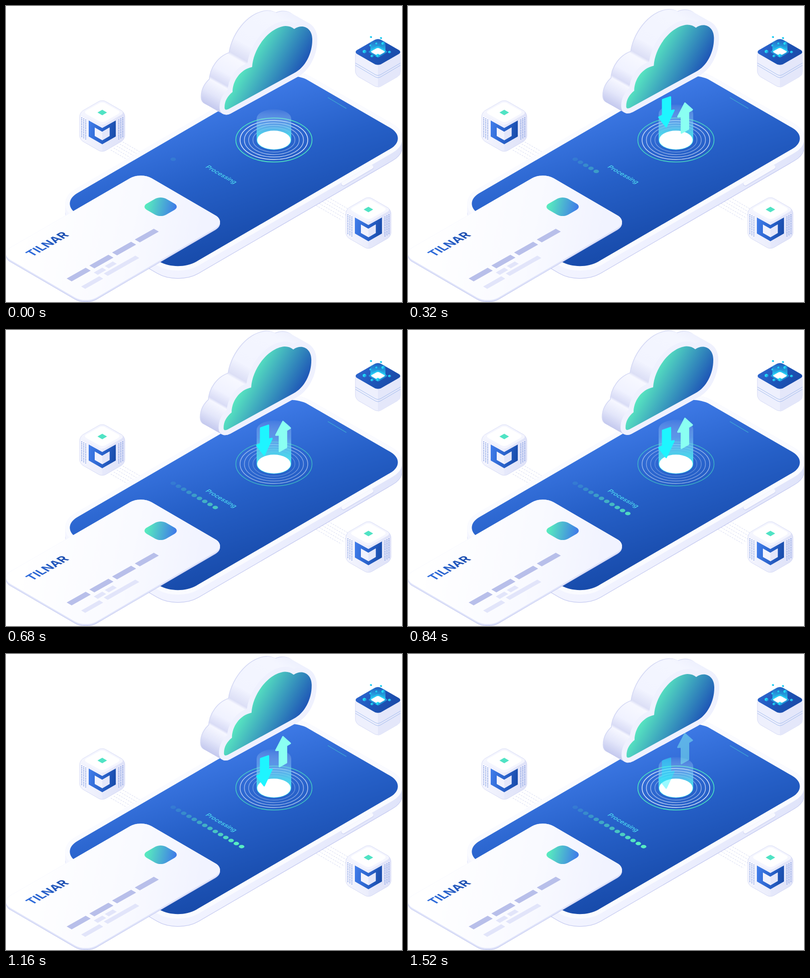
Recreate the animation shown at these times as an HTML page. Size 790 px wide and 592 px high, loop 1560 ms.

```html
<!DOCTYPE html>
<html lang="en">
<head>
<meta charset="utf-8">
<title>Processing</title>
<style>
html, body { margin: 0; width: 100%; height: 100%; overflow: hidden; background: #fff; }
svg { display: block; width: 100%; height: 100%; }
text { font-family: Inter, Roboto, sans-serif; }
</style>
</head>
<body>
<svg id="stage" viewBox="0 0 790 592" xmlns="http://www.w3.org/2000/svg"></svg>
<script>
const LOOP = 1560, STEP = 40;
const stage = document.getElementById('stage');
const clamp = (v) => Math.max(0, Math.min(1, v));
const ease = (v) => (1 - Math.cos(Math.PI * clamp(v))) / 2;
const list = (n, fn) => Array.from({ length: n }, (_, i) => fn(i)).join('');

// Polygon with corners rounded like circles seen in perspective
function poly(pts, r) {
  const n = pts.length;
  const toward = (a, b, d) => {
    const k = d / Math.hypot(b[0] - a[0], b[1] - a[1]);
    return (a[0] + (b[0] - a[0]) * k).toFixed(1) + ',' + (a[1] + (b[1] - a[1]) * k).toFixed(1);
  };
  return pts.map((p, i) => {
    const prev = pts[(i + n - 1) % n], next = pts[(i + 1) % n], h = r * 0.448;
    return (i ? 'L' : 'M') + toward(p, prev, r) +
      'C' + [toward(p, prev, h), toward(p, next, h), toward(p, next, r)].join(' ');
  }).join('') + 'Z';
}

const path = (d, fill, more = '') => `<path d="${d}" fill="${fill}" ${more}/>`;
const line = (d, color, more = '') => `<path d="${d}" fill="none" stroke="${color}" ${more}/>`;
const rhomb = (x, y, w, h) => [[x, y - h], [x + w, y], [x, y + h], [x - w, y]];

// Stacks shifted copies from back to front
const stack = (n, dx, dy, draw) => list(n + 1, (i) => {
  const k = 1 - i / n;
  return `<g transform="translate(${(dx * k).toFixed(2)} ${(dy * k).toFixed(2)})">${draw(i)}</g>`;
});

function grad(id, x1, y1, x2, y2, stops) {
  return `<linearGradient id="${id}" gradientUnits="userSpaceOnUse" x1="${x1}" y1="${y1}" x2="${x2}" y2="${y2}">` +
    stops.map(([o, c, a = 1]) => `<stop offset="${o}" stop-color="${c}" stop-opacity="${a}"/>`).join('') +
    '</linearGradient>';
}

const shade = [[20, '#bfc4ec'], [48, '#e3e6fa'], [72, '#f6f7ff'], [77, '#d9dcf6'], [98, '#f0f2ff'],
  [133, '#f7f8ff'], [139, '#dcdff6'], [168, '#f2f4ff'], [245, '#f4f6ff'], [290, '#e8ebfc']]
  .map(([s, c]) => [(s - 20) / 270, c]);

const defs = '<defs>' +
  grad('screenFill', 430, 170, 530, 470, [[0, '#407ce9'], [0.5, '#2660c8'], [1, '#174aa9']]) +
  grad('sideFill', 118, 0, 790, 0, [[0, '#f5f6ff'], [0.5, '#f0f2ff'], [1, '#e0e4fa']]) +
  grad('cardFill', 40, 430, 380, 500, [[0, '#ffffff'], [0.6, '#f9faff'], [1, '#f1f3ff']]) +
  grad('chipFill', 282, 396, 338, 408, [[0, '#57e8bf'], [0.5, '#4bb1d3'], [1, '#3f7be8']]) +
  grad('brandFill', 0, 0, 86, 0, [[0, '#2f6dde'], [1, '#1a4cae']]) +
  grad('skyFill', 470, 122, 563, 175, [[0, '#59e9c0'], [0.5, '#3b9fbe'], [1, '#1e55b6']]) +
  grad('edgeFill', 10, -17, 142, -252, shade) +
  grad('boxFill', 147, 0, 237, 0, [[0, '#f4f5fe'], [0.49, '#eceefc'], [0.51, '#e6e9fb'], [1, '#dfe2f8']]) +
  grad('badgeFill', 165, 245, 219, 255, [[0, '#3f7be8'], [0.5, '#2b64cd'], [1, '#184ba9']]) +
  grad('lidFill', 715, 75, 765, 112, [[0, '#2b63cb'], [0.5, '#1e55b8'], [1, '#1a4cab']]) +
  grad('rayFill', 0, 66, 0, 94, [[0, '#27e4ff', 0], [1, '#27e4ff', 0.9]]) +
  grad('beamFill', 0, 205, 0, 276, [[0, '#ffffff', 0.05], [0.35, '#8fcdfb', 0.42], [0.7, '#52d8ee', 0.9], [1, '#4df0f5', 1]]) +
  '</defs>';

function phone() {
  const d = poly([[566, 127.5], [803, 264.7], [343, 532.5], [106, 395.3]], 42);
  const rim = (c, w) => path(d, c, `stroke="${c}" stroke-width="${w}"`);
  return stack(16, 0, 16, (i) => i ? rim('url(#sideFill)', 18) : rim('#c6cbf1', 18.6)) +
    rim('#fafbff', 18) + path(d, 'url(#screenFill)') +
    line('M642,183L679,205', '#3fa9d2', 'stroke-width="1.2"') +
    line('M673,356L729,323', '#d5d9f5', 'stroke-width="9" stroke-linecap="round"') +
    line('M673,355L729,322', '#f8f9ff', 'stroke-width="7.5" stroke-linecap="round"') +
    '<text transform="matrix(.866 .5 -.866 .5 397 322.5)" font-size="12.6" font-weight="500" fill="#4fdcf0">Processing</text>';
}

function card() {
  const d = poly([[269, 332], [439.4, 431.3], [159.2, 595.5], [-12.8, 495.5]], 25);
  const bar = (x, y, w, t, c) => path(
    `M${x},${y}l${w},${-w * 0.567}l${t},${t * 0.58}l${-w},${w * 0.567}Z`, c);
  return stack(5, 0, 4, (i) => path(d, i ? '#dfe3fa' : '#bcc2ec')) +
    path(d, 'url(#cardFill)') +
    path(poly(rhomb(308.5, 401.5, 38.5, 22.2), 12.5), 'url(#chipFill)') +
    '<text transform="matrix(.866 -.5 .866 .5 52 502)" font-size="23.5" font-weight="700" fill="url(#brandFill)">TILNAR</text>' +
    list(4, (i) => bar(121 + i * 45.3, 545 - i * 26, 38, 10, '#b8bfea')) +
    bar(175, 533, 17, 8, '#e2e5fa') + bar(197, 520, 16, 8, '#e2e5fa') +
    bar(150, 561, 36, 8, '#e2e5fa') + bar(195, 535, 63, 8, '#e2e5fa');
}

function cube(dx, dy) {
  const column = (x, y, h) => line(`M${x},${y}v${h}`, '#4d74d3', 'stroke-width="1.4" stroke-dasharray="1.5 1.9"');
  return `<g transform="translate(${dx} ${dy})">` +
    path(poly([[192, 187], [237, 213], [237, 267], [192, 293], [147, 267], [147, 213]], 8),
      'url(#boxFill)', 'stroke="#c9cef2" stroke-width=".7"') +
    path(poly(rhomb(192, 213.5, 45, 26), 8), '#f4f5fe') +
    path(poly(rhomb(192, 212.5, 38, 21.5), 7), '#ffffff') +
    path('M182.5,213L192,207.5L201.5,213L192,218.5Z', '#50e3c4') +
    list(3, (i) => column(151 + i * 4, 223 + i * 2.3, 40) + column(233 - i * 4, 223 + i * 2.3, 40)) +
    path('M165,229L192,244L219,229V261L192,276.5L165,261Z', 'url(#badgeFill)') +
    path('M177,243L192,251.5L206.5,243V260L192,268.5L177,260Z', '#f1f2fd') +
    path('M192,251.5L206.5,243V260L192,268.5Z', '#e4e7fa') + '</g>';
}

function chest() {
  const bits = [[728, 62, 2], [748, 64, 2], [727, 79, 2], [739, 75, 2], [752, 75, 3], [715, 91, 3.4],
    [765, 92, 2.6], [730, 100, 2.6], [742, 99, 3.4]];
  return path(poly([[742, 65], [787, 91], [787, 138], [742, 164], [697, 138], [697, 91]], 8),
    '#eef0fd', 'stroke="#c9cef2" stroke-width=".7"') +
    path('M742,118L787,92V134Q787,138 783,140L746,162L742,163Z', '#e4e7fa') +
    line('M697,114L737,137.5Q742,140.5 747,137.5L787,114M697,118.5L737,142Q742,145 747,142L787,118.5', '#9fb9ec', 'stroke-width=".9"') +
    path(poly(rhomb(742, 92, 48.5, 28), 8), 'url(#lidFill)') +
    path(poly(rhomb(742, 91.5, 20, 12), 3), '#20c8f4', 'opacity=".55"') +
    path('M727,91V70L742,64L757,70V91L742,99Z', 'url(#rayFill)') +
    path(poly(rhomb(742, 91.5, 15, 8.5), 3), '#ffffff') +
    bits.map(([x, y, s]) =>
      path(`M${x - s},${y - s / 2}l${s},${-s / 2}l${s},${s / 2}v${s}l${-s},${s / 2}l${-s},${-s / 2}Z`, '#22dcf5') +
      path(`M${x},${y}l${s},${-s / 2}v${s}l${-s},${s / 2}Z`, '#1fa6e6')).join('');
}

function wires() {
  const dash = (d) => line(d, '#cfd4f0', 'stroke-width=".9" stroke-dasharray="3 2.2"');
  return list(5, (i) => dash(`M${233 - i * 6},${272 + i * 4}l38,22`)) +
    list(5, (i) => dash(`M${643 - i * 6},${383 + i * 4}l50,29`));
}

function cloud() {
  const d = 'M436,203C436,190 442,180 452,172C452,150 467,127 491,122C493,85 525,42 558,40Q568,40 575,46' +
    'C592,34 612,44 611,68C611,95 597,123 575,134L444,206Q436,210 436,203Z';
  const body = (c, w = 20) => path(d, c, `stroke="${c}" stroke-width="${w}" stroke-linejoin="round"`);
  return '<g id="cloud">' +
    stack(36, -37, -21, (i) => i ? body('url(#edgeFill)') : body('#d6daf5', 21)) +
    body('#eff1fe') + path(d, 'url(#skyFill)') + '</g>';
}

function portal() {
  const ring = (i) => `<ellipse cx="534.5" cy="268" rx="${76 - i * 8.5}" ry="${44 - i * 4.95}" fill="none" ` +
    `stroke="${i ? '#e3ecff' : '#4fe8c0'}" stroke-width="1.5" opacity="${[1, 0.95, 0.75, 0.58, 0.42][i]}"/>`;
  const arrow = (id, d, c) => `<g id="${id}">${path(d, c, `stroke="${c}" stroke-width="3" stroke-linejoin="round"`)}</g>`;
  return `<g id="rings">${list(5, ring)}</g>` +
    '<path id="shaft" fill="url(#beamFill)"/>' +
    '<ellipse cx="534.5" cy="268" rx="33.3" ry="18.8" fill="#fff"/>' +
    arrow('down', 'M508,187.5L523.5,182V210L530.5,208.5L515,241.5L500.5,222.5L508,218.5Z', '#1ef5ff') +
    arrow('up', 'M552.5,194.5L567,207.5L559.5,212V246L545.5,254V221L538.5,221.5Z', '#8afff2');
}

const dots = '<g id="dots">' + list(14, (i) =>
  `<ellipse cx="${333.5 + i * 10.5}" cy="${306.5 + i * 6.05}" rx="5.5" ry="3.5" fill="#58eec2" ` +
  `opacity="${(0.12 + 0.88 * Math.min(1, i / 12)).toFixed(2)}"/>`) + '</g>';

stage.innerHTML = defs + wires() + phone() + dots + card() + cube(0, 0) + cube(531, 194) + chest() +
  portal() + cloud();

const el = (id) => document.getElementById(id);
const [cloudEl, rings, shaft, down, up, beam] = ['cloud', 'rings', 'shaft', 'down', 'up', 'beamFill'].map(el);
const dotEls = [...el('dots').children];
const move = (node, x, y) => node.setAttribute('transform', `translate(${x.toFixed(2)} ${y.toFixed(2)})`);

function render(t) {
  const lift = t < 820 ? ease(t / 800) : 1 - ease((t - 840) / 730);
  const travel = ease((t - 40) / 1520);
  const alpha = t > 1400 ? clamp((1610 - t) / 200) : clamp(t / 200);

  move(cloudEl, -2 * lift, -7.5 * lift);
  rings.setAttribute('opacity', 1 - 0.42 * lift);

  const top = 207 - 27 * lift;
  shaft.setAttribute('d', `M500,268V${top + 18}A34.5,18.5 0 0 1 569,${top + 18}V268A34.5,19.5 0 0 1 500,268Z`);
  beam.setAttribute('y1', top);

  move(down, 0, 29 * travel - 2.4);
  move(up, 0, 3 - 38 * travel);
  down.setAttribute('opacity', alpha);
  up.setAttribute('opacity', alpha);

  const shown = Math.floor(1 + t / 80);
  dotEls.forEach((dot, i) => dot.setAttribute('visibility', i < shown ? 'visible' : 'hidden'));
}

const start = performance.now();
function tick() {
  const t = (performance.now() - start) % LOOP;
  render(Math.floor(t / STEP) * STEP);
  requestAnimationFrame(tick);
}
render(0);
requestAnimationFrame(tick);
</script>
</body>
</html>
```
